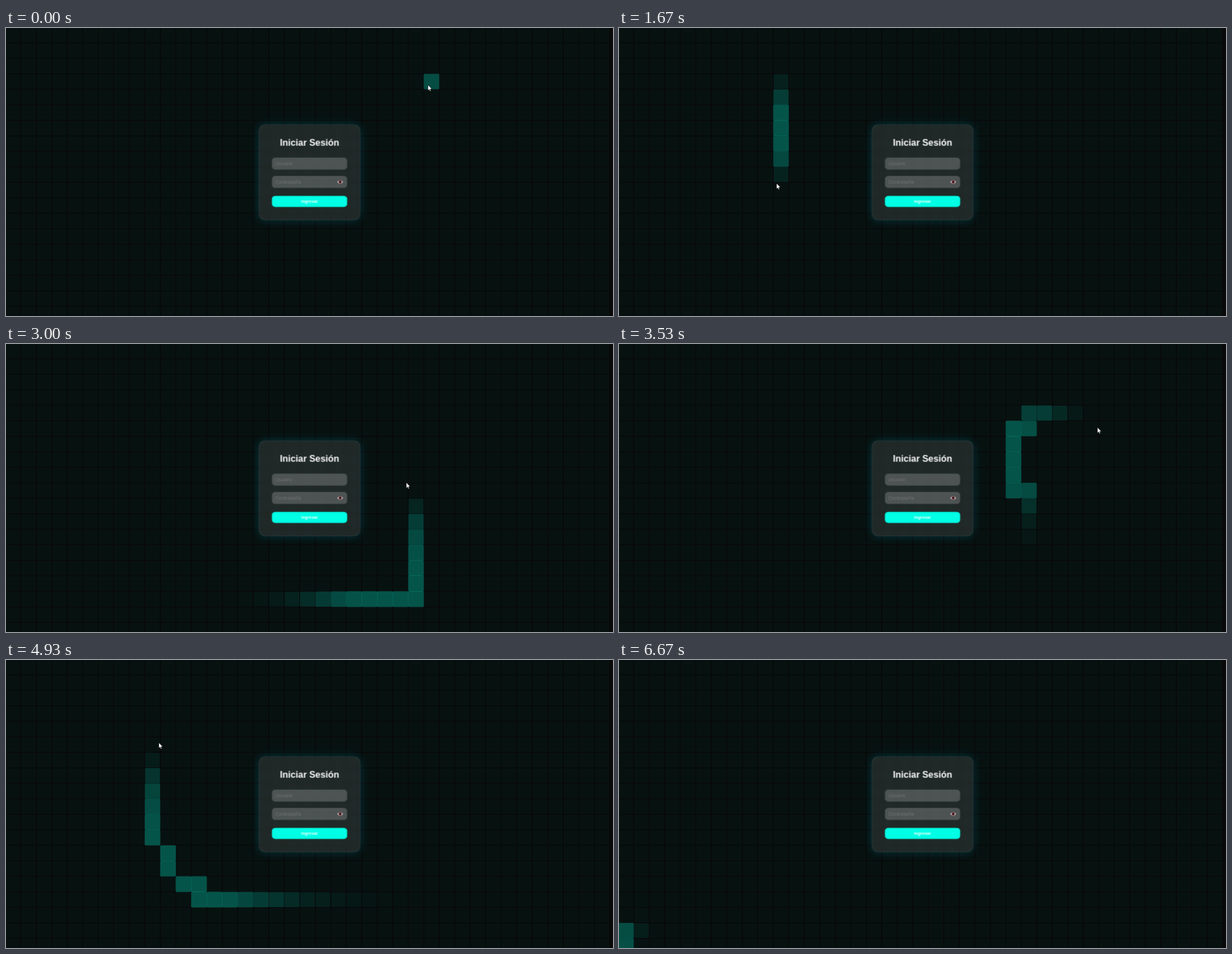
An HTML page with a canvas for the animation above (6740 ms loop, 1086 by 515 pixels).

```html
<!DOCTYPE html>
<html lang="es">
<head>
<meta charset="utf-8">
<title>Iniciar Sesión</title>
<style>
  html, body { margin: 0; width: 100%; height: 100%; overflow: hidden; background: #09090a; }
  canvas, .cursor { position: absolute; left: 0; top: 0; display: block; }
  .card {
    position: absolute; left: 543px; top: 257.5px; width: 320px; height: 301px;
    box-sizing: border-box; padding: 40px; border: 1px solid rgba(255, 255, 255, .2); border-radius: 20px;
    transform: translate(-50%, -50%) scale(.5656);
    background: rgba(255, 255, 255, .1); backdrop-filter: blur(10px);
    box-shadow: 0 0 30px rgba(0, 200, 255, .22);
    font-family: "Liberation Sans", Arial, sans-serif; color: #fff; text-align: center;
  }
  h2 { margin: 0 0 30px; font-size: 28.8px; line-height: 33px; white-space: nowrap; }
  .field {
    position: relative; height: 38px; margin-bottom: 20px; padding-left: 10px; border-radius: 10px;
    background: rgba(255, 255, 255, .2); color: #757575;
    font-size: 16px; line-height: 38px; text-align: left;
  }
  .field svg { position: absolute; right: 11px; top: 9px; }
  .button {
    margin-top: 25px; border-radius: 10px; background: #00ffe5;
    font-size: 13.33px; font-weight: bold; line-height: 35px;
  }
</style>
</head>
<body>
<canvas id="grid" width="1086" height="515"></canvas>
<div class="card">
  <h2>Iniciar Sesión</h2>
  <div class="field">Usuario</div>
  <div class="field">Contraseña
    <svg width="22" height="20" viewBox="-11 -10 22 20">
      <path d="M-9.5 0Q0 -13 9.5 0Q0 13 -9.5 0Z" fill="#f4f0f0" stroke="#2a2426"/>
      <circle r="5" fill="#6b2a33"/>
      <circle r="2.6" fill="#150b0d"/>
    </svg>
  </div>
  <div class="button">Ingresar</div>
</div>
<svg class="cursor" width="1086" height="515">
  <path id="cursor" d="M0 0V9.8L2.2 7.7L3.7 11.1L5.2 10.5L3.8 7.1H6.9Z" fill="#fff" stroke="#000" stroke-width=".5"/>
</svg>
<script>
const LOOP = 6740, STEP = 200 / 3;
const PITCH = 27.73, CELL = 26, OX = -1.3, OY = -1.3, COLS = 39, ROWS = 19;
const LAG = 50, HOLD = 500, FADE = 300;

// Turning points of the pointer: time, x, y
const keys = [
  [0, 755, 102], [730, 377, 95], [1000, 298, 99], [1150, 284, 142], [1670, 282, 279],
  [1980, 295, 387], [2200, 406, 447], [2470, 636, 460], [2600, 721, 452], [2830, 728, 332],
  [3190, 708, 165], [3365, 748, 137], [3530, 855, 148], [3870, 907, 340], [4010, 868, 424],
  [4290, 498, 427], [4400, 379, 426], [4510, 304, 387], [4600, 276, 332], [4760, 262, 240],
  [4930, 274, 149], [5210, 193, 92], [5345, 160, 112], [5535, 138, 248], [5765, 82, 374],
  [5930, 38, 462], [6300, 22, 520]
];

const slope = (i, axis) => {
  const a = keys[i - 1], b = keys[i + 1];
  return a && b ? (b[axis] - a[axis]) / (b[0] - a[0]) : 0;
};

// Smooth curve through the turning points
function pointer(t) {
  let i = 0;
  while (i < keys.length - 2 && keys[i + 1][0] <= t) i++;
  const a = keys[i], b = keys[i + 1], span = b[0] - a[0];
  const s = Math.min(1, Math.max(0, (t - a[0]) / span)), q = 1 - s;
  return [1, 2].map(axis =>
    a[axis] * q * q * (1 + 2 * s) + b[axis] * s * s * (1 + 2 * q) +
    span * s * q * (slope(i, axis) * q - slope(i + 1, axis) * s));
}

// CSS "ease": cubic-bezier(.25, .1, .25, 1)
function ease(x) {
  if (x <= 0) return 0;
  if (x >= 1) return 1;
  const bez = (s, a, b) => 3 * s * (1 - s) * (1 - s) * a + 3 * s * s * (1 - s) * b + s * s * s;
  let lo = 0, hi = 1;
  for (let i = 0; i < 20; i++) {
    const mid = (lo + hi) / 2;
    if (bez(mid, .25, .25) < x) lo = mid; else hi = mid;
  }
  return bez(lo, .1, 1);
}

// Cells in the order the pointer enters them
const visits = [];
for (let t = -230, last = ""; t < 6300; t += 8) {
  const [x, y] = pointer(t);
  const c = Math.floor((x - OX) / PITCH), r = Math.floor((y - OY) / PITCH);
  if (last !== c + "," + r) visits.push({ c, r, t });
  last = c + "," + r;
}

const ctx = document.getElementById("grid").getContext("2d");
const cursor = document.getElementById("cursor");

function cell(c, r, size, radius) {
  const inset = (PITCH - size) / 2;
  ctx.beginPath();
  ctx.roundRect(OX + c * PITCH + inset, OY + r * PITCH + inset, size, size, radius);
  ctx.fill();
}

function draw(t) {
  ctx.fillStyle = "#09090a";
  ctx.fillRect(0, 0, 1086, 515);
  ctx.fillStyle = "#071210";
  for (let r = 0; r < ROWS; r++)
    for (let c = 0; c < COLS; c++) cell(c, r, CELL, 1.2);
  for (const v of visits) {
    const age = t - v.t - LAG;
    const glow = ease(age / FADE) - ease((age - HOLD) / FADE);
    if (glow <= 0) continue;
    ctx.fillStyle = `rgba(0,255,224,${0.28 * glow})`;
    cell(v.c, v.r, CELL * (1 + 0.09 * glow), 1.2 + glow);
  }
  const [x, y] = pointer(t);
  cursor.setAttribute("transform", `translate(${x} ${y})`);
}

// The picture advances 15 times a second, on 10 ms ticks
let shown = -1;
function tick() {
  const ticks = Math.floor(performance.now() % LOOP / 10);
  const n = Math.floor((ticks + 0.5) * 0.15);
  if (n !== shown) draw((shown = n) * STEP);
  requestAnimationFrame(tick);
}
tick();
</script>
</body>
</html>
```
